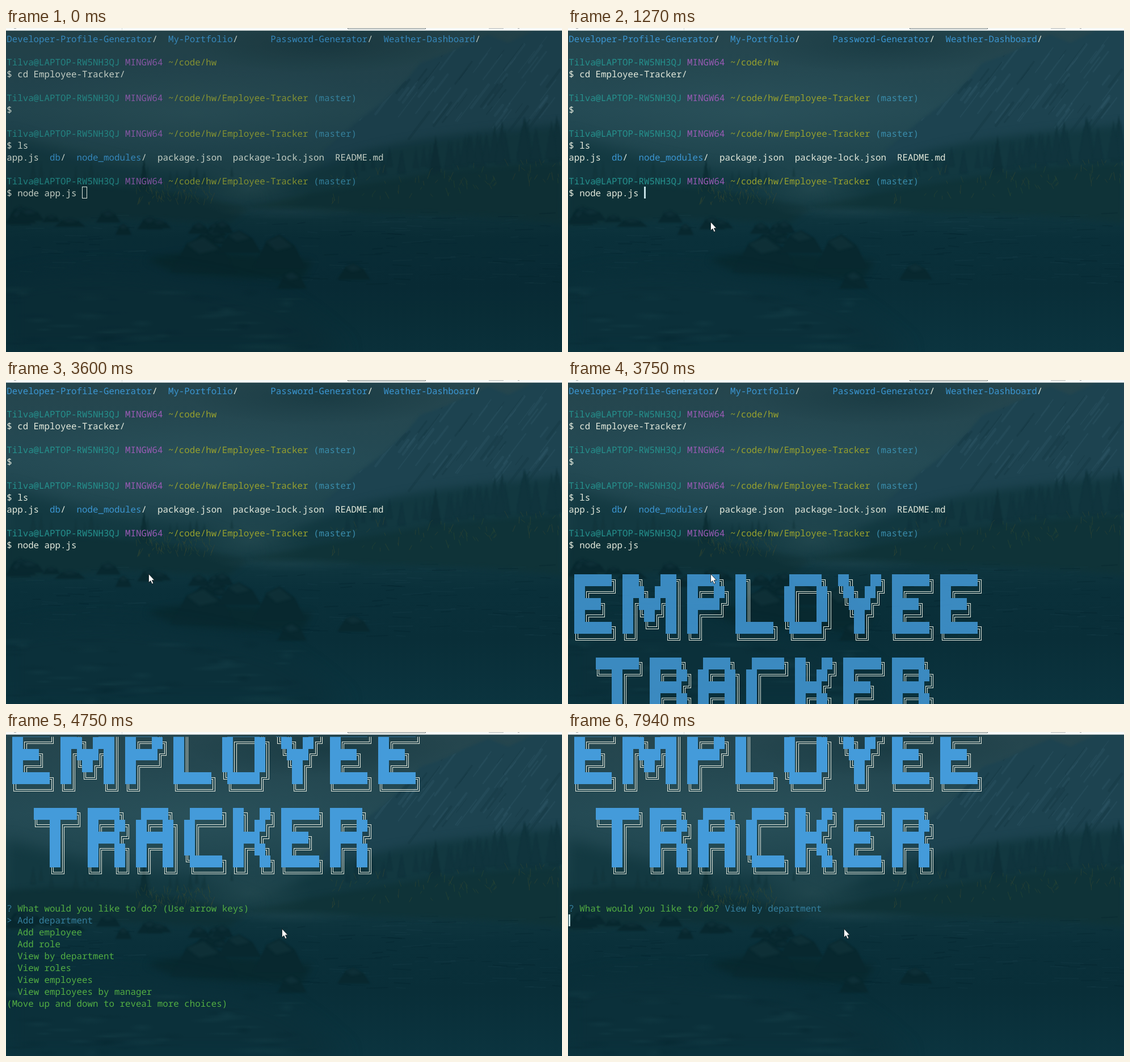
Write an HTML page with a canvas that moves like this. It is 980 by 572 pixels and loops after 8 s.

```html
<!DOCTYPE html>
<html lang="en">
<head>
<meta charset="utf-8">
<title>Employee Tracker terminal</title>
<style>
html, body { margin: 0; width: 100%; height: 100%; overflow: hidden; background: #0b323c; }
#stage { position: relative; width: 980px; height: 572px; overflow: hidden; }
#stage > * { position: absolute; left: 0; top: 0; }
#veil { width: 980px; height: 572px; background: #000; }
span {
  position: absolute; white-space: pre;
  font: 15.82px/20.92px "Noto Sans Mono", "DejaVu Sans Mono", monospace;
  text-rendering: geometricPrecision; font-variant-ligatures: none;
}
#caret { box-sizing: border-box; height: 21px; }
#caret.hollow { width: 9px; border: 1px solid #dfe6dc; }
#caret.bar { width: 2.5px; background: #c4dfe4; }
</style>
</head>
<body>
<div id="stage">
  <canvas id="scene" width="980" height="572"></canvas>
  <div id="veil"></div>
  <svg width="980" height="572">
    <defs><clipPath id="view"><rect y="8.6" width="980" height="564"/></clipPath></defs>
    <g clip-path="url(#view)"><g id="banner" shape-rendering="crispEdges">
      <path id="blocks" fill="#449bda"/>
      <path id="lines" fill="none" stroke="#e4e9dd"/>
    </g></g>
  </svg>
  <div id="shell"></div>
  <div id="menu"></div>
  <div id="caret"></div>
  <svg id="strip" width="980" height="5">
    <rect width="980" height="4.6" fill="#f8fbf9"/>
    <path d="M14 0h4M902 0h3" stroke="#555"/>
    <path d="M204.5 0v4" stroke="#d5dad8"/>
    <path d="M602.5 0v1.5h137v-1.5" fill="none" stroke="#707878"/>
    <rect x="851" width="26" height="2" fill="#d3d6d5"/>
  </svg>
  <svg id="mouse" width="16" height="22" style="overflow:visible">
    <path d="M.5 .5V15.6L3.9 12.4 6.4 18 8.8 17 6.4 11.4H10.7Z" fill="#fff" stroke="#10191c" stroke-width=".8"/>
  </svg>
</div>
<script>
const $ = id => document.getElementById(id);
const LOOP = 8000, CW = 9.49, RH = 20.92, X0 = 1.2, Y0 = 8.6;
const colX = c => X0 + c * CW, rowY = r => Y0 + r * RH;
const INK = { w: '#e3e9dc', b: '#3b96d2', t: '#25928e', p: '#9a5bb5', y: '#98a12d', m: '#3a8dac', g: '#53ae43', h: '#357f9e' };

// Segments alternate ink key and text, laid out on the character grid.
function write(box, row, ...parts) {
  let col = 0;
  for (let i = 0; i < parts.length; i += 2) {
    for (const word of parts[i + 1].matchAll(/\S+(?: \S+)*/g)) {
      const el = document.createElement('span');
      el.textContent = word[0];
      el.style.cssText = `left:${colX(col + word.index)}px;top:${rowY(row)}px;color:${INK[parts[i]]}`;
      box.append(el);
    }
    col += parts[i + 1].length;
  }
}

function writeShell() {
  const out = (row, ...parts) => write($('shell'), row, ...parts);
  const prompt = (row, dir, branch = '') =>
    out(row, 't', 'Tilva@LAPTOP-RW5NH3QJ ', 'p', 'MINGW64 ', 'y', dir + ' ', 'm', branch);
  const repo = '~/code/hw/Employee-Tracker';
  out(0, 'b', 'Developer-Profile-Generator', 'w', '/  ', 'b', 'My-Portfolio', 'w', '/      ',
    'b', 'Password-Generator', 'w', '/  ', 'b', 'Weather-Dashboard', 'w', '/');
  prompt(2, '~/code/hw');
  out(3, 'w', '$ cd Employee-Tracker/');
  prompt(5, repo, '(master)');
  out(6, 'w', '$');
  prompt(8, repo, '(master)');
  out(9, 'w', '$ ls');
  out(10, 'w', 'app.js  ', 'b', 'db', 'w', '/  ', 'b', 'node_modules',
    'w', '/  package.json  package-lock.json  README.md');
  prompt(12, repo, '(master)');
  out(13, 'w', '$ node app.js');
}

const CHOICES = ['Add department', 'Add employee', 'Add role', 'View by department',
  'View roles', 'View employees', 'View employees by manager'];
const ASK = 'What would you like to do? ';

function writeMenu(state) {
  const box = $('menu');
  box.replaceChildren();
  if (state < 0) return;
  if (state === 4) return write(box, 14, 'h', '? ', 'g', ASK, 'h', CHOICES[3]);
  write(box, 14, 'h', '? ', 'g', ASK + (state ? '' : '(Use arrow keys)'));
  CHOICES.forEach((name, i) =>
    write(box, 15 + i, i === state ? 'h' : 'g', (i === state ? '> ' : '  ') + name));
  write(box, 22, 'g', '(Move up and down to reveal more choices)');
}

const GLYPHS = {
  E: ['███████╗', '██╔════╝', '█████╗  ', '██╔══╝  ', '███████╗', '╚══════╝'],
  M: ['███╗   ███╗', '████╗ ████║', '██╔████╔██║', '██║╚██╔╝██║', '██║ ╚═╝ ██║', '╚═╝     ╚═╝'],
  P: ['██████╗ ', '██╔══██╗', '██████╔╝', '██╔═══╝ ', '██║     ', '╚═╝     '],
  L: ['██╗     ', '██║     ', '██║     ', '██║     ', '███████╗', '╚══════╝'],
  O: [' ██████╗ ', '██╔═══██╗', '██║   ██║', '██║   ██║', '╚██████╔╝', ' ╚═════╝ '],
  Y: ['██╗   ██╗', '╚██╗ ██╔╝', ' ╚████╔╝ ', '  ╚██╔╝  ', '   ██║   ', '   ╚═╝   '],
  T: ['████████╗', '╚══██╔══╝', '   ██║   ', '   ██║   ', '   ██║   ', '   ╚═╝   '],
  R: ['██████╗ ', '██╔══██╗', '██████╔╝', '██╔══██╗', '██║  ██║', '╚═╝  ╚═╝'],
  A: [' █████╗ ', '██╔══██╗', '███████║', '██╔══██║', '██║  ██║', '╚═╝  ╚═╝'],
  C: [' ██████╗', '██╔════╝', '██║     ', '██║     ', '╚██████╗', ' ╚═════╝'],
  K: ['██╗  ██╗', '██║ ██╔╝', '█████╔╝ ', '██╔═██╗ ', '██║  ██╗', '╚═╝  ╚═╝']
};
const CORNERS = { '╔': [1, 1], '╗': [-1, 1], '╚': [1, -1], '╝': [-1, -1] };

function buildBanner() {
  let blocks = '', lines = '';
  const cell = (ch, col, row) => {
    const x = colX(col), y = rowY(row), cx = x + CW / 2, cy = y + RH / 2, g = 1.6;
    if (ch === '█') blocks += `M${x} ${y}h${CW}v${RH}h${-CW}z`;
    for (const s of [-g, g]) {
      if (ch === '═') lines += `M${x} ${cy + s}h${CW}`;
      if (ch === '║') lines += `M${cx + s} ${y}v${RH}`;
      if (CORNERS[ch]) {
        const [dx, dy] = CORNERS[ch];
        lines += `M${cx + dx * s} ${cy + dy * RH / 2}V${cy + dy * s}H${cx + dx * CW / 2}`;
      }
    }
  };
  const word = (text, col, row) => {
    for (const letter of text) {
      GLYPHS[letter].forEach((line, r) => [...line].forEach((ch, c) => cell(ch, col + c, row + r)));
      col += GLYPHS[letter][0].length + 1;
    }
  };
  word('EMPLOYEE', 1, 16);
  word('TRACKER', 5, 23);
  $('blocks').setAttribute('d', blocks);
  $('lines').setAttribute('d', lines);
}

function paintScene() {
  const c = $('scene').getContext('2d');
  let seed = 7;
  const rnd = (a = 0, b = 1) => {
    seed = (seed * 16807) % 2147483647;
    return a + (b - a) * seed / 2147483647;
  };
  const shape = (fill, d, blur = 0) => {
    c.filter = blur ? `blur(${blur}px)` : 'none';
    c.fillStyle = fill;
    c.fill(new Path2D(d));
    c.filter = 'none';
  };
  const glow = (x, y, rx, ry, rgb, a) => {
    c.save();
    c.translate(x, y);
    c.scale(rx, ry);
    const g = c.createRadialGradient(0, 0, 0, 0, 0, 1);
    g.addColorStop(0, `rgba(${rgb},${a})`);
    g.addColorStop(1, `rgba(${rgb},0)`);
    c.fillStyle = g;
    c.fillRect(-1, -1, 2, 2);
    c.restore();
  };
  const tree = (x, base, h, fill) => {
    const w = h * .17;
    let d = `M${x} ${base - h}`;
    for (let i = 1; i <= 5; i++) d += `L${x + w * i / 5} ${base - h + h * i / 5}l${-w * .09} 0`;
    for (let i = 5; i >= 1; i--) d += `L${x - w * i / 5} ${base - h + h * i / 5}l${w * .09} 0`;
    shape(fill, d + 'Z', .8);
  };

  const sky = c.createLinearGradient(0, 0, 0, 572);
  [[0, '#25454d'], [.25, '#244a54'], [.42, '#1e444d'], [.54, '#113841'],
    [.65, '#0a303a'], [.8, '#092e38'], [1, '#0b343f']].forEach(s => sky.addColorStop(...s));
  c.fillStyle = sky;
  c.fillRect(0, 0, 980, 572);
  glow(330, 150, 330, 90, '52,91,99', .35);
  glow(560, 30, 240, 50, '17,50,58', .5);

  // Mountain with its snow streaks
  const ridge = 'M560 215L625 160 668 128 705 92 730 62 775 46 812 28 850 12 885 26 930 5H980V270H560Z';
  shape('#1d4350', ridge, 2);
  c.save();
  c.clip(new Path2D(ridge));
  c.lineCap = 'round';
  for (let i = 0; i < 75; i++) {
    const x = rnd(640, 980), y = rnd(15, 150), len = rnd(12, 48);
    c.strokeStyle = rnd() < .6 ? 'rgba(73,115,129,.16)' : 'rgba(10,41,51,.2)';
    c.lineWidth = rnd(1, 5);
    c.beginPath();
    c.moveTo(x, y);
    c.quadraticCurveTo(x - len * .3, y + len * .4, x - len * .75, y + len);
    c.stroke();
  }
  c.restore();

  // Forest and banks
  shape('#123840', 'M540 250C640 205 760 190 980 170V300H440Z', 8);
  for (let i = 0; i < 44; i++) {
    const x = rnd(600, 985), near = (x - 600) / 385;
    tree(x, 255 - near * 30 + rnd(-5, 12), 22 + near * rnd(38, 75), '#10343d');
  }
  tree(757, 262, 72, '#0e3038');
  shape('#133941', 'M0 190C90 215 180 245 330 260L450 305H0Z', 12);
  for (let i = 0; i < 18; i++) tree(rnd(0, 400), rnd(262, 285), rnd(15, 40), '#12363d');
  tree(243, 298, 68, '#0c2e34');
  shape('#0e3137', 'M0 280C130 265 300 285 430 318L390 345 200 335 0 350Z', 5);
  shape('#0f3338', 'M430 315C560 285 620 280 720 262S900 245 980 238V345C850 325 620 328 430 318Z', 5);
  glow(430, 285, 110, 48, '52,88,92', .35);
  glow(500, 325, 130, 14, '35,73,82', .4);

  // Grass tufts
  c.lineWidth = 1;
  for (let i = 0; i < 170; i++) {
    const right = i % 2, x = right ? rnd(570, 980) : rnd(230, 365);
    const y = right ? rnd(262, 312) - (x - 570) * .07 : rnd(280, 314);
    c.strokeStyle = `rgba(${rnd(52, 82)},${rnd(74, 86)},46,.4)`;
    c.beginPath();
    c.moveTo(x, y);
    c.lineTo(x + rnd(-7, 7), y - rnd(4, 15));
    c.stroke();
  }

  // Water ripples
  for (let i = 0; i < 170; i++) {
    const y = rnd(325, 455), x = i % 4 ? rnd(430, 980) : rnd(0, 220);
    c.strokeStyle = rnd() < .5 ? 'rgba(3,33,44,.3)' : 'rgba(40,82,94,.15)';
    c.lineWidth = rnd(.6, 2);
    c.beginPath();
    c.moveTo(x, y);
    c.lineTo(x + rnd(12, 45), y + rnd(-2, 2));
    c.stroke();
  }

  // Rocks
  const rock = (x, y, w, h) => {
    shape('#08282f', `M${x} ${y}l${w * .25} ${-h * .8} ${w * .25} ${-h * .2} ${w * .3} ${h * .35} ${w * .2} ${h * .65}Z`, 1.5);
    shape('rgba(31,67,75,.3)', `M${x + w * .25} ${y - h * .78}l${w * .25} ${-h * .18} ${w * .24} ${h * .32} ${-w * .3} ${h * .12}Z`, 2);
  };
  for (let i = 0; i < 16; i++) {
    const x = rnd(0, 370);
    rock(x, 338 + x * .09 + rnd(-10, 12), rnd(25, 60), rnd(10, 24));
  }
  shape('#08292f', 'M250 410C310 385 460 400 540 412L520 445 400 440 300 435Z', 6);
  rock(290, 432, 115, 65);
  rock(372, 397, 78, 40);
  rock(436, 424, 92, 60);
  rock(584, 444, 58, 28);
  rock(478, 460, 52, 30);
  shape('#0b303a', 'M0 450C130 415 260 430 380 455S520 500 600 572H0Z', 16);
  for (let i = 0; i < 60; i++) {
    const x = rnd(0, 520), y = rnd(455, 570);
    glow(x, y, rnd(14, 55), rnd(3, 10), rnd() < .5 ? '4,36,45' : '30,76,84', .2);
  }
}

function mouseAt(t) {
  if (t < 170) return null;
  const a = Math.min(9, Math.floor((t - 170) / 76.6)) / 9, left = (1 - a) ** 2;
  if (t < 4370) return [251 + 503 * left, 342 + 217 * left];
  const b = Math.min(6, Math.floor((t - 4370) / 76) + 1) / 6, p = b * (2 - b);
  return [251 + 235 * p, 342 + 5 * p];
}

// Start time, caret style, column, row
const CARET = [[0, 'hollow', 14, 13], [1180, 'bar', 14, 13], [1730, ''], [2040, 'bar', 0, 14],
  [2500, ''], [3050, 'bar', 0, 14], [3600, ''], [7940, 'bar', 0, 15]];
const MENU = [3830, 6540, 6920, 7320, 7940];
let menuState = null;

function draw(t) {
  const focus = t < 1180 ? 0 : t < 1270 ? .5 : 1;
  $('veil').style.opacity = (1 - focus) * .08;
  $('shell').style.opacity = .84 + .16 * focus;
  $('shell').style.display = t < 3830 ? '' : 'none';

  $('banner').style.display = t < 3750 ? 'none' : '';
  $('banner').setAttribute('transform', `translate(0 ${t < 3830 ? 0 : -17 * RH})`);
  $('blocks').style.opacity = t < 3830 ? .84 : 1;

  const state = MENU.filter(s => t >= s).length - 1;
  if (state !== menuState) writeMenu(menuState = state);

  const [, style, col = 0, row = 0] = CARET.findLast(k => t >= k[0]);
  $('caret').className = style;
  $('caret').style.transform = `translate(${Math.round(colX(col))}px,${Math.round(rowY(row) - .2)}px)`;

  const pos = mouseAt(t);
  $('mouse').style.display = pos ? '' : 'none';
  if (pos) $('mouse').style.transform = `translate(${Math.round(pos[0])}px,${Math.round(pos[1])}px)`;
}

paintScene();
buildBanner();
writeShell();
const start = performance.now();
(function tick() {
  draw((performance.now() - start) % LOOP);
  requestAnimationFrame(tick);
})();
</script>
</body>
</html>
```
